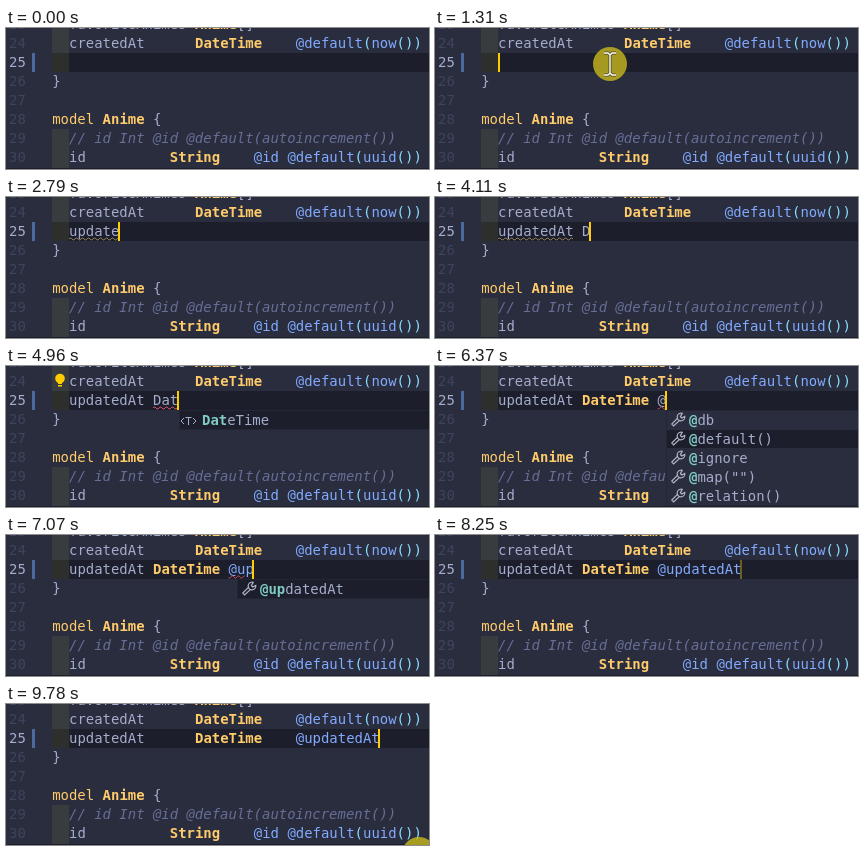
These frames come from a looping animation (423 by 141 pixels, 9.86 s). An HTML page with a canvas:

```html
<!DOCTYPE html>
<html lang="en">
<head>
<meta charset="utf-8">
<title>Schema editor</title>
<style>
  html, body { margin: 0; width: 100%; height: 100%; overflow: hidden; background: #292d3e; }
  canvas { display: block; width: 423px; height: 141px; }
</style>
</head>
<body>
<canvas id="stage" width="423" height="141"></canvas>
<script>
const ctx = document.getElementById('stage').getContext('2d');
const LOOP = 9860, W = 423, H = 141;
const LEFT = 63, CHAR = 8.4, ROW = 19, TOP = 25, ACTIVE = 25;
const C = {
  bg: '#292d3e', line: '#1c1f2b', fg: '#a6accd', type: '#ffcb6b', fn: '#82aaff',
  paren: '#89ddff', note: '#676e95', num: '#3f445e', teal: '#80cbc4',
  caret: '#ffcc00', warn: '#8a7a55', error: '#d0506a', bar: '#4d6a9e'
};
const FACE = '"DejaVu Sans Mono", "Noto Sans Mono", monospace';

const rowY = n => TOP + (n - ACTIVE) * ROW;
const colX = c => LEFT + c * CHAR;

function rect(x, y, w, h, color) {
  ctx.fillStyle = color;
  ctx.fillRect(x, y, w, h);
}

function text(str, x, y, color, style = '') {
  ctx.font = `${style} 13.95px ${FACE}`;
  ctx.fillStyle = color;
  ctx.fillText(str, x, y);
}

// Each part is [column, text, colour, style].
function codeLine(n, parts) {
  for (const [col, str, color, style] of parts) text(str, colX(col), rowY(n) + 14, color, style);
}

function attribute(col, name, call) {
  const open = col + name.length;
  return [
    [col, name, C.fn], [open, '(', C.paren], [open + 1, call, C.fn],
    [open + 1 + call.length, '())', C.paren]
  ];
}

const doc = {
  23: [[0, 'favoriteAnimes', C.fg], [15, 'Anime', C.type, 'bold'], [20, '[]', C.fg]],
  24: [[0, 'createdAt', C.fg], [15, 'DateTime', C.type, 'bold'], ...attribute(27, '@default', 'now')],
  26: [[-2, '}', C.fg]],
  28: [[-2, 'model', C.type], [4, 'Anime', C.type, 'bold'], [10, '{', C.fg]],
  29: [[0, '// id Int @id @default(autoincrement())', C.note, 'italic']],
  30: [[0, 'id', C.fg], [12, 'String', C.type, 'bold'], [22, '@id', C.fn], ...attribute(26, '@default', 'uuid')]
};

// Times at which the edited line changes, with the resulting text.
const edits = [[1310, '']];
const typed = 'updatedAt Da';
[2230, 2310, 2390, 2470, 2620, 2700, 2870, 3190, 3340, 3410, 4110, 4280]
  .forEach((t, i) => edits.push([t, typed.slice(0, i + 1)]));
edits.push(
  [4580, 'updatedAt Dat'], [5210, 'updatedAt DateTime'], [5510, 'updatedAt DateTime '],
  [6220, 'updatedAt DateTime @'], [6690, 'updatedAt DateTime @u'],
  [7000, 'updatedAt DateTime @up'], [7530, 'updatedAt DateTime @updatedAt'],
  [8380, 'updatedAt      DateTime    @updatedAt']
);

// [start, end, from column, to column, colour]
const squiggles = [
  [2700, 2950, 0, 6, C.warn], [2950, 3480, 0, 7, C.warn], [3480, 4430, 0, 9, C.warn],
  [4430, 4660, 10, 12, C.error], [4660, 5280, 10, 13, C.error],
  [6370, 6750, 19, 20, C.error], [6750, 7300, 19, 21, C.error],
  [7300, 7610, 19, 22, C.error], [7610, 7840, 20, 22, C.error]
];

// [start, end, left, selected row, matched letters, labels]
const menus = [
  [4350, 4660, 173, 0, 2, ['DateTime', 'Decimal']],
  [4660, 5280, 173, 0, 3, ['DateTime']],
  [6300, 6750, 231, 1, 1, ['@db', '@default()', '@ignore', '@map("")', '@relation()']],
  [6750, 7070, 231, 0, 2, ['@updatedAt', '@unique', '@default()']],
  [7070, 7570, 231, 0, 3, ['@updatedAt']]
];

// Pointer stops: [time, x, y]; it is out of view between null stops.
const pointer = [
  [0, null], [70, 206, 118], [155, 236, 118], [240, null],
  [780, 198, 57], [855, 190, 39], [930, 181, 20], [1080, 178, 28], [1160, 175, 36],
  [1390, 250, 57], [1465, 390, 96], [1540, null]
];

const during = (t, list) => list.filter(s => t >= s[0] && t < s[1]);
const latest = (t, list) => list.filter(s => t >= s[0]).pop();

function squiggle(from, to, color) {
  ctx.beginPath();
  for (let x = colX(from), end = colX(to); x <= end; x += 1) {
    ctx.lineTo(x, 42 + 1.1 * Math.sin(x * Math.PI / 3));
  }
  ctx.strokeStyle = color;
  ctx.lineWidth = 1;
  ctx.stroke();
}

function editedLine(str) {
  const rule = /\S+/g;
  for (let m; (m = rule.exec(str));) {
    const word = m[0];
    const isType = word === 'DateTime';
    const color = isType ? C.type : /^@\w/.test(word) ? C.fn : C.fg;
    text(word, colX(m.index), rowY(ACTIVE) + 14, color, isType ? 'bold' : '');
  }
}

function caretAlpha(age) {
  if (age < 620) return 1;
  if (age < 780) return 1 - (age - 620) / 160;
  if (age < 1170) return 0;
  return Math.min(1, (age - 1170) / 80);
}

function typeIcon(x, y) {
  ctx.strokeStyle = C.fg;
  ctx.lineWidth = 1;
  ctx.beginPath();
  ctx.moveTo(x + 3, y - 3); ctx.lineTo(x, y); ctx.lineTo(x + 3, y + 3);
  ctx.moveTo(x + 12, y - 3); ctx.lineTo(x + 15, y); ctx.lineTo(x + 12, y + 3);
  ctx.moveTo(x + 4.5, y - 3.5); ctx.lineTo(x + 10.5, y - 3.5);
  ctx.moveTo(x + 7.5, y - 3.5); ctx.lineTo(x + 7.5, y + 4);
  ctx.stroke();
}

function wrenchIcon(x, y) {
  ctx.strokeStyle = '#b4b8c8';
  ctx.lineWidth = 1.2;
  ctx.beginPath();
  ctx.arc(x + 10, y - 3, 3.8, -0.15, Math.PI * 1.6);
  ctx.lineTo(x + 9.4, y - 3.4);
  ctx.lineTo(x + 10.8, y - 2);
  ctx.closePath();
  ctx.moveTo(x + 6.4, y - 1.6);
  ctx.lineTo(x + 0.8, y + 4); ctx.lineTo(x + 2.6, y + 6); ctx.lineTo(x + 8.6, y + 0.4);
  ctx.stroke();
}

function menu(left, selected, matched, labels) {
  const top = rowY(ACTIVE + 1), h = labels.length * ROW;
  rect(left, top, W - left, h + 1, '#232635');
  rect(left + 1, top + 1, W - left, h - 1, C.bg);
  labels.forEach((label, i) => {
    const y = top + i * ROW, x = left + 23;
    if (i === selected) rect(left + 1, y + 1, W - left, ROW - 1, C.line);
    if (label[0] === '@') wrenchIcon(left + 5, y + 10);
    else typeIcon(left + 2, y + 11);
    text(label.slice(0, matched), x, y + 15, C.teal, 'bold');
    text(label.slice(matched), x + matched * CHAR, y + 15, C.fg);
  });
}

function bulb() {
  ctx.fillStyle = C.caret;
  ctx.beginPath();
  ctx.arc(54, 12.5, 4.8, 0, Math.PI * 2);
  ctx.fill();
  rect(52, 16, 4, 2, C.caret);
  rect(52, 19, 4, 1.5, C.caret);
}

function halo(x, y) {
  ctx.fillStyle = 'rgba(200, 184, 28, .8)';
  ctx.beginPath();
  ctx.arc(x, y, 17, 0, Math.PI * 2);
  ctx.fill();
}

function beam(x, y) {
  ctx.beginPath();
  ctx.moveTo(x - 6, y - 11); ctx.lineTo(x - 2, y - 11); ctx.lineTo(x, y - 9);
  ctx.lineTo(x + 2, y - 11); ctx.lineTo(x + 6, y - 11);
  ctx.moveTo(x, y - 9); ctx.lineTo(x, y + 9);
  ctx.moveTo(x - 6, y + 11); ctx.lineTo(x - 2, y + 11); ctx.lineTo(x, y + 9);
  ctx.lineTo(x + 2, y + 11); ctx.lineTo(x + 6, y + 11);
  for (const [w, color] of [[3, '#4a4720'], [1.4, '#fff']]) {
    ctx.lineWidth = w;
    ctx.strokeStyle = color;
    ctx.stroke();
  }
}

function editor() {
  rect(0, 0, W, H, C.bg);
  rect(46, rowY(ACTIVE), W - 46, ROW, C.line);
  for (const n of [23, 24, 25, 29, 30, 31]) {
    rect(46, rowY(n), LEFT - 46, ROW, 'rgba(255, 255, 64, .07)');
  }
  rect(26, rowY(ACTIVE), 3, ROW, C.bar);
  for (let n = 23; n <= 30; n++) {
    text(String(n), 3, rowY(n) + 14, n === ACTIVE ? C.fg : C.num);
    if (doc[n]) codeLine(n, doc[n]);
  }
  rect(0, 140, W, 1, '#1b1e2b');
}

function draw(t) {
  editor();
  const edit = latest(t, edits);
  if (edit) {
    const [since, str] = edit;
    editedLine(str);
    for (const [, , from, to, color] of during(t, squiggles)) squiggle(from, to, color);
    ctx.globalAlpha = caretAlpha(t - since);
    rect(Math.floor(colX(str.length)) - (str ? 1 : 0), rowY(ACTIVE), 2, ROW, C.caret);
    ctx.globalAlpha = 1;
  }
  if (t >= 4960 && t < 5590) bulb();
  for (const [, , ...m] of during(t, menus)) menu(...m);

  const [, x, y] = latest(t, pointer);
  if (x !== null) {
    if (t >= 1160 && t < 1465) halo(x, y);
    beam(x, y);
  }
  if (t >= 9780) halo(413, 150);
}

function tick(now) {
  draw(now % LOOP);
  requestAnimationFrame(tick);
}
draw(0);
requestAnimationFrame(tick);
</script>
</body>
</html>
```
